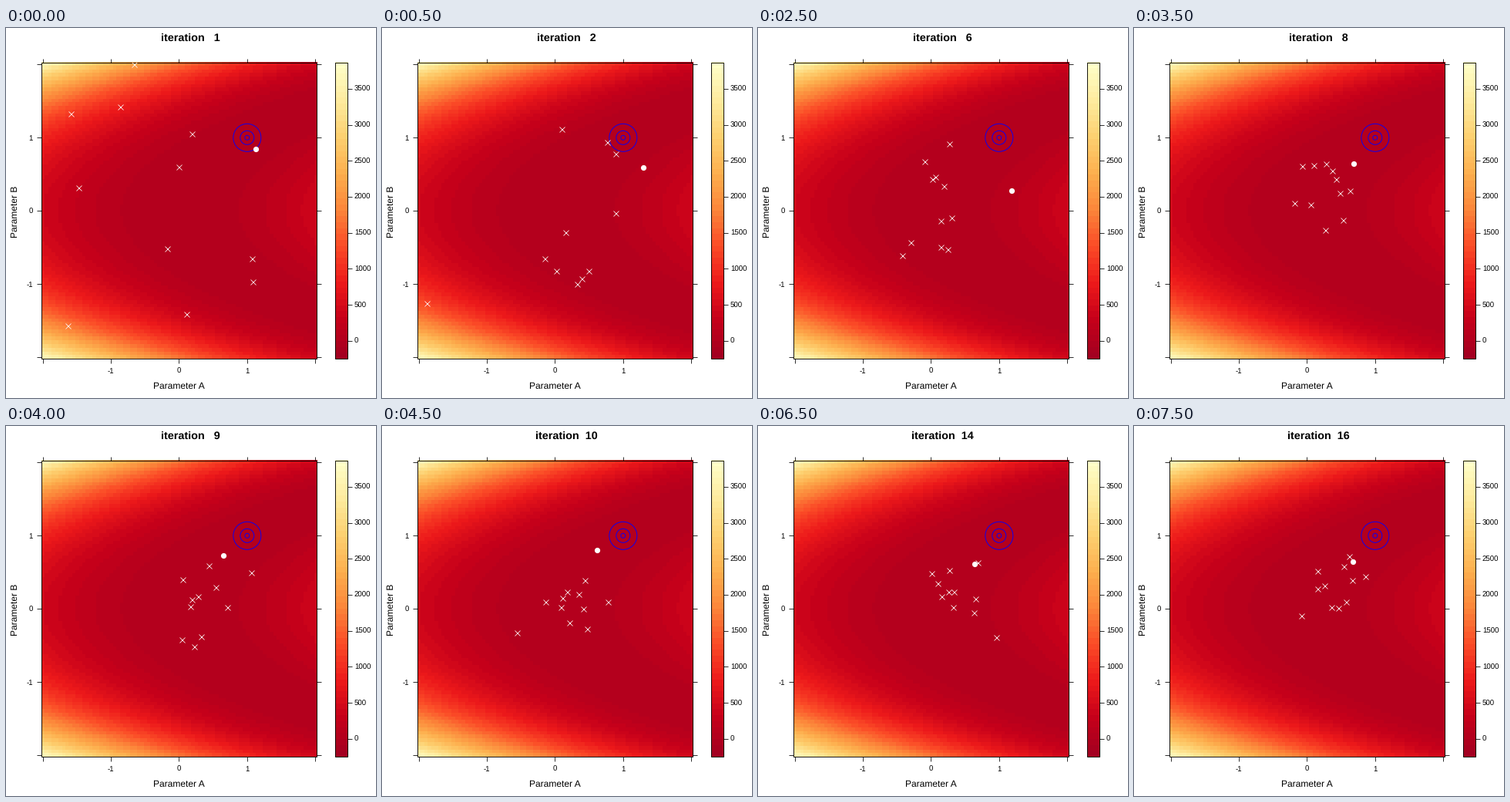
Animation, 480 px wide and 480 px high, one loop 8 s. Source, as a matplotlib script:

```python
import numpy as np
import matplotlib.pyplot as plt
from matplotlib.animation import FuncAnimation
from matplotlib.colors import LinearSegmentedColormap
from matplotlib.patches import Circle, Rectangle

SIZE, DPI = 480, 72
STEPS, INTERVAL = 16, 500
LEFT, RIGHT, TOP, BOTTOM = 45.5, 403.4, 45, 429.4
BAR_L, BAR_R = 426.7, 443.4
LIM, BANDS, SWARM = 2.025, 50, 11

plt.rcParams.update({"font.family": "Liberation Sans",
                     "text.hinting": "no_hinting"})

# Key points of the best candidate: iteration, A, B
BEST = np.array([(1, 1.13, 0.85), (4, 1.62, 0.08), (6, 1.18, 0.28),
                 (8, 0.69, 0.65), (10, 0.62, 0.8), (12, 0.61, 0.57),
                 (16, 0.67, 0.65)]).T


def px(a):
    return LEFT + (a + LIM) / (2 * LIM) * (RIGHT - LEFT)


def py(b):
    return BOTTOM - (b + LIM) / (2 * LIM) * (BOTTOM - TOP)


def swarm(step):
    """Candidates that drift towards the minimum and draw together."""
    rng = np.random.default_rng(40 + step)
    drift = (step - 1) / (STEPS - 1)
    center = np.array([0.45, 0.25]) * drift
    spread = 0.2 + np.exp((1 - step) / 4)
    return np.clip(rng.normal(center, spread, (SWARM, 2)), -2, 2)


fig = plt.figure(figsize=(SIZE / DPI, SIZE / DPI), dpi=DPI, facecolor="white")
ax = fig.add_axes([0, 0, 1, 1])
ax.axis("off")

cmap = LinearSegmentedColormap.from_list("fire", [
    "#a30021", "#c6001a", "#ed1a1b", "#fb4b27", "#fc853a",
    "#fdaf4e", "#fdd070", "#feeb9e", "#ffffc8"], N=BANDS)

# Rosenbrock surface, with the colour range padded by 7 %
grid = np.linspace(-2, 2, 81)
a, b = np.meshgrid(grid, grid)
z = 100 * (a - b ** 2) ** 2 + (1 - a) ** 2
pad = 0.07 * np.ptp(z)
z_min, z_max = z.min() - pad, z.max() + pad

style = dict(cmap=cmap, vmin=z_min, vmax=z_max, origin="lower",
             interpolation="nearest", aspect="auto")
ax.imshow(z, extent=(LEFT, RIGHT, BOTTOM, TOP), **style)
bands = np.linspace(z_min, z_max, BANDS)[:, None]
ax.imshow(bands, extent=(BAR_L, BAR_R, BOTTOM, TOP), **style)
ax.set_xlim(0, SIZE)
ax.set_ylim(SIZE, 0)


def line(x0, y0, x1, y1):
    ax.plot([x0, x1], [y0, y1], color="black", lw=0.8, solid_capstyle="butt")


def label(x, y, text, size=9.6, ha="center", **kw):
    return ax.text(x, y, text, fontsize=size, ha=ha, va="baseline", **kw)


for x0, x1 in ((LEFT, RIGHT), (BAR_L, BAR_R)):
    ax.add_patch(Rectangle((x0, TOP), x1 - x0, BOTTOM - TOP, fill=False,
                           ec="black", lw=0.9, zorder=4))

for v in range(-2, 3):
    x, y = px(v), py(v)
    line(x, TOP, x, TOP - 5.5)
    line(x, BOTTOM, x, BOTTOM + 5.5)
    line(LEFT, y, LEFT - 5.5, y)
    line(RIGHT, y, RIGHT + 5.5, y)
    if abs(v) < 2:
        label(x, 448.2, str(v))
        label(35, y + 3.4, str(v), ha="right")

for v in range(0, 3501, 500):
    y = BOTTOM - (v - z_min) / (z_max - z_min) * (BOTTOM - TOP)
    line(BAR_R, y, BAR_R + 5.5, y)
    label(452, y + 3.4, str(v), ha="left")

label(224.7, 468.2, "Parameter A", 12)
label(15, 238, "Parameter B", 12, rotation=90, rotation_mode="anchor")
title = label(239.7, 17.2, "", 14.4, weight="bold")

for r in (18, 9, 3):
    ax.add_patch(Circle((px(1), py(1)), r, fill=False, ec="blue", lw=0.9,
                        zorder=3))

panel = Rectangle((LEFT, TOP), RIGHT - LEFT, BOTTOM - TOP,
                  transform=ax.transData)
crosses, = ax.plot([], [], "x", color="white", ms=7, mew=0.75, zorder=5)
best, = ax.plot([], [], "o", color="white", ms=7.2, mew=0, zorder=6)
for marks in (crosses, best):
    marks.set_clip_path(panel)


def draw(i):
    step = i + 1
    title.set_text(f"iteration {step:3d}")
    pts_a, pts_b = swarm(step).T
    crosses.set_data(px(pts_a), py(pts_b))
    best_a, best_b = (np.interp(step, BEST[0], row) for row in BEST[1:])
    best.set_data([px(best_a)], [py(best_b)])
    return title, crosses, best


anim = FuncAnimation(fig, draw, frames=STEPS, interval=INTERVAL,
                     repeat=True, repeat_delay=0)
plt.show()
```
